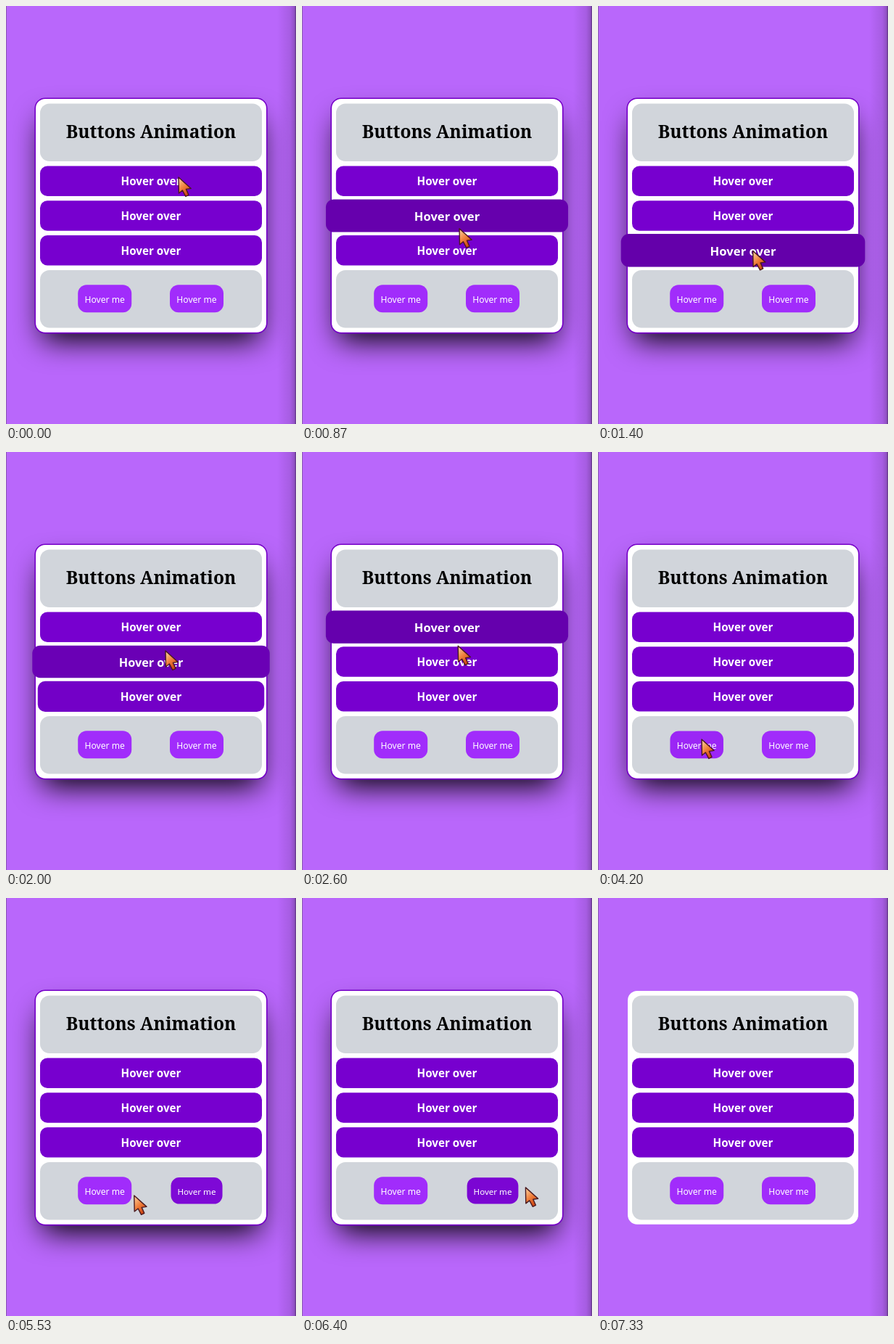
Animation of 400 by 576 pixels, one loop 7.4 s. Source, as an HTML page:

```html
<!DOCTYPE html>
<html lang="en">
<head>
<meta charset="utf-8">
<title>Buttons Animation</title>
<style>
  html, body { margin: 0; width: 100%; height: 100%; overflow: hidden; background: #b967fb; }
  svg { display: block; width: 400px; height: 576px; }
  text { text-anchor: middle; }
  .title { font: 700 24.5px "Noto Serif", Georgia, serif; }
  .row { font: 700 15.2px "Noto Sans", "Open Sans", sans-serif; fill: #fff; }
  .small { font: 400 12.1px "Noto Sans", "Open Sans", sans-serif; fill: #fff; }
</style>
</head>
<body>
<svg viewBox="0 0 400 576">
  <defs>
    <linearGradient id="edge">
      <stop offset="0" stop-opacity="0"/>
      <stop offset=".7" stop-opacity=".1"/>
      <stop offset=".92" stop-opacity=".22"/>
      <stop offset="1" stop-opacity=".5"/>
    </linearGradient>
    <linearGradient id="flame" x1=".1" y1="0" x2=".7" y2="1">
      <stop offset=".1" stop-color="#f9c08a"/>
      <stop offset=".5" stop-color="#f0803c"/>
      <stop offset="1" stop-color="#c83c0c"/>
    </linearGradient>
    <filter id="blur" x="-30%" y="-30%" width="160%" height="160%" color-interpolation-filters="sRGB">
      <feGaussianBlur stdDeviation="20"/>
    </filter>
  </defs>
  <rect width="400" height="576" fill="#b967fb"/>
  <rect x="374" width="26" height="576" fill="url(#edge)"/>
  <rect width="1" height="576" fill="#8a58b4"/>
  <g id="glow">
    <rect x="50.6" y="157.6" width="298.8" height="302.6" rx="4" filter="url(#blur)"/>
    <rect x="39.4" y="126.4" width="321.2" height="325" rx="14.5" fill="#7600c8"/>
  </g>
  <rect x="41" y="128" width="318" height="321.8" rx="13" fill="#fff"/>
  <g fill="#d1d5db">
    <rect x="47" y="134.5" width="306" height="79.5" rx="13"/>
    <rect x="47" y="364" width="306" height="79.5" rx="13"/>
  </g>
  <text class="title" x="200" y="182.4">Buttons Animation</text>
  <g id="buttons"></g>
  <path id="cursor" d="M0 0 L.4 22 L5.4 18 L9.8 26.4 L14 24.4 L10.4 16.4 L17.2 15.4 Z"
    fill="url(#flame)" stroke="#4a1a20" stroke-width="1.4" stroke-linejoin="round"/>
</svg>
<script>
const LOOP = 7400, STEP = LOOP / 111, FADE = 400, SCAN = 5;
const $ = id => document.getElementById(id);

// Turning points of the pointer: time, x, y
const path = [
  [0, 238, 236], [600, 228, 268], [870, 217, 307], [1650, 214, 338], [2000, 220, 274],
  [2300, 220, 236], [2950, 209, 312], [3250, 206, 311], [3400, 205, 319], [3600, 198, 342],
  [4130, 152, 381], [4200, 143, 396], [4750, 150, 404], [5450, 250, 406], [5530, 178, 410],
  [5750, 140, 404], [6250, 270, 400], [6800, 410, 396]
];

const rowLook = { w: 306, h: 41.4, r: 10, cls: 'row', label: 'Hover over', base: 6.2,
  grow: .1, from: [119, 0, 207], to: [100, 0, 170] };
const smallLook = { w: 74, h: 38, r: 12, cls: 'small', label: 'Hover me', base: 5.6,
  grow: -.05, from: [161, 44, 251], to: [117, 0, 205] };
const buttons = [
  ...[0, 1, 2].map(i => ({ ...rowLook, x: 200, y: 241.2 + 47.8 * i })),
  ...[-1, 1].map(side => ({ ...smallLook, x: 199.6 + 63.4 * side, y: 403.3 }))
];
const card = { x: 200, y: 289, w: 320, h: 324 };

for (const b of buttons) {
  b.node = document.createElementNS('http://www.w3.org/2000/svg', 'g');
  b.node.innerHTML = `<rect x="${-b.w / 2}" y="${-b.h / 2}" width="${b.w}" height="${b.h}" rx="${b.r}"/>
    <text class="${b.cls}" y="${b.base}">${b.label}</text>`;
  $('buttons').append(b.node);
}

// CSS "ease": cubic-bezier(.25, .1, .25, 1)
function ease(p) {
  if (p <= 0) return 0;
  if (p >= 1) return 1;
  const bez = (a, b, s) => 3 * a * s * (1 - s) ** 2 + 3 * b * s * s * (1 - s) + s ** 3;
  let lo = 0, hi = 1;
  for (let i = 0; i < 20; i++) {
    const mid = (lo + hi) / 2;
    if (bez(.25, .25, mid) < p) lo = mid; else hi = mid;
  }
  return bez(.1, 1, lo);
}

// Smooth curve through the turning points
function pointer(t) {
  const last = path.length - 1;
  let i = 0;
  while (i < last - 1 && path[i + 1][0] <= t) i++;
  const a = path[i], b = path[i + 1], span = b[0] - a[0];
  const s = Math.min(1, (t - a[0]) / span);
  const slope = (k, axis) => {
    const p = path[Math.max(0, k - 1)], n = path[Math.min(last, k + 1)];
    return (n[axis] - p[axis]) / (n[0] - p[0]) * span;
  };
  return [1, 2].map(axis =>
    a[axis] * (1 + 2 * s) * (1 - s) ** 2 + b[axis] * s * s * (3 - 2 * s) +
    slope(i, axis) * s * (1 - s) ** 2 - slope(i + 1, axis) * s * s * (1 - s));
}

// Times at which the pointer enters and leaves a box
function hoverSpans(box, firstEnter = 0) {
  const spans = [];
  let inside = false;
  for (let t = 0; t < LOOP; t += SCAN) {
    const [x, y] = pointer(t);
    const hit = Math.abs(x - box.x) < box.w / 2 && Math.abs(y - box.y) < box.h / 2;
    if (hit && !inside) spans.push([t || firstEnter, LOOP]);
    if (!hit && inside) spans[spans.length - 1][1] = t;
    inside = hit;
  }
  return spans;
}

function hover(spans, t) {
  return Math.max(...spans.map(([enter, leave]) =>
    ease((Math.min(t, leave) - enter) / FADE) * (1 - ease((t - leave) / FADE))));
}

card.spans = hoverSpans(card, -FADE);
for (const b of buttons) b.spans = hoverSpans(b);

function draw(time) {
  const t = Math.floor((time % LOOP + 5) / STEP) * STEP % LOOP;
  $('glow').setAttribute('opacity', hover(card.spans, t));
  for (const b of buttons) {
    const k = hover(b.spans, t);
    const color = b.from.map((c, i) => Math.round(c + (b.to[i] - c) * k));
    b.node.setAttribute('transform', `translate(${b.x} ${b.y}) scale(${1 + b.grow * k})`);
    b.node.firstChild.setAttribute('fill', `rgb(${color})`);
  }
  $('cursor').setAttribute('transform', `translate(${pointer(t)})`);
}

const start = performance.now();
function tick() {
  draw(performance.now() - start);
  requestAnimationFrame(tick);
}
tick();
</script>
</body>
</html>
```
